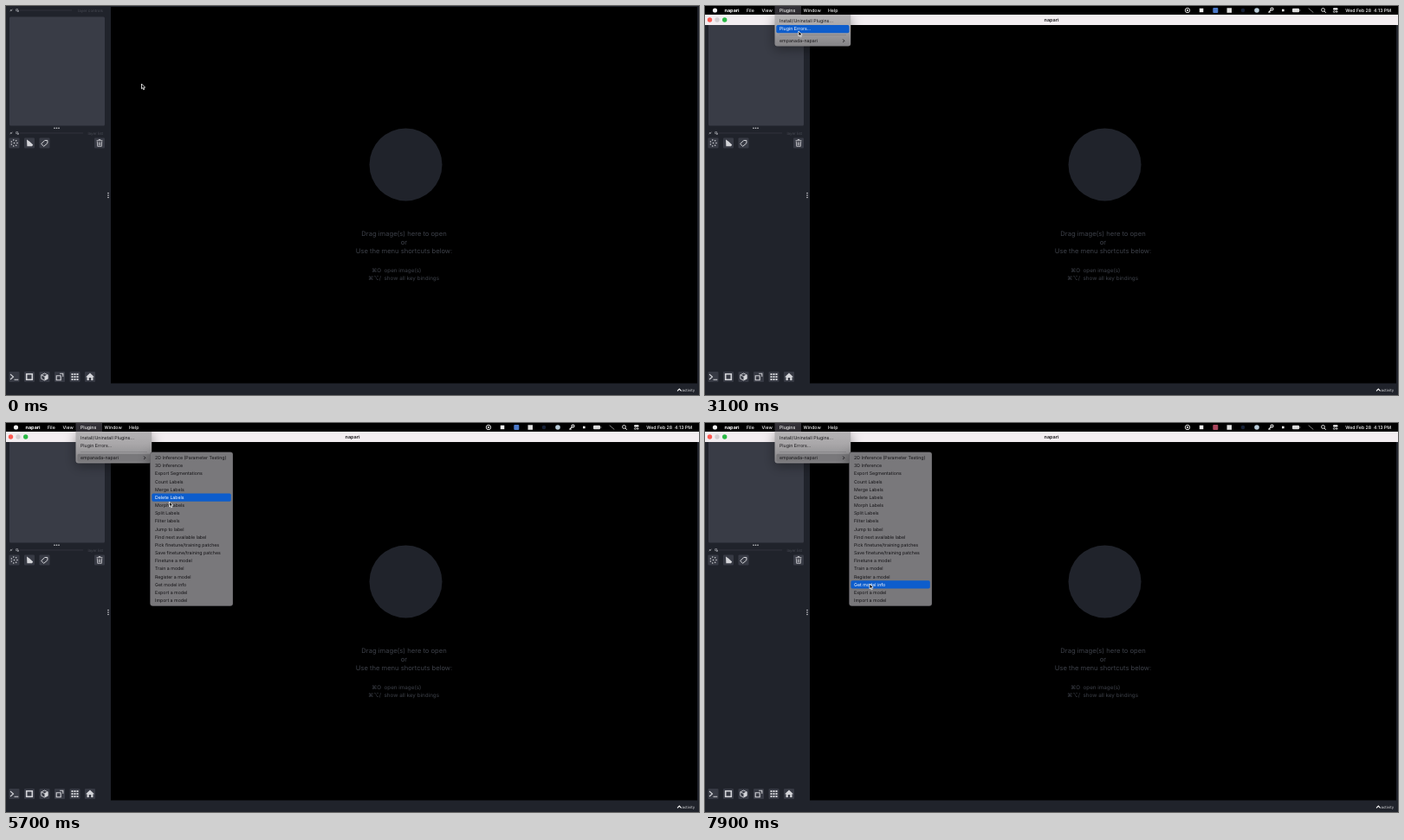
Animation of 800 by 450 pixels, one loop 8 s. Source, as an HTML page with a canvas:

```html
<!DOCTYPE html>
<html lang="en">
<head>
<meta charset="utf-8">
<title>Plugin menu</title>
<style>
html, body { margin: 0; width: 100%; height: 100%; overflow: hidden; background: #20232b; }
canvas { display: block; width: 800px; height: 450px; }
</style>
</head>
<body>
<canvas id="stage" width="800" height="450"></canvas>
<script>
const ctx = document.getElementById('stage').getContext('2d');
const LOOP = 8000, STEP = 100;
const PANEL = '#20232b', BUTTON = '#373a44', ICON = '#d3d4d8', DIM = '#3d4049', BLUE = '#0d5dcc';

const MENU = [['Install/Uninstall Plugins...', 17], ['Plugin Errors...', 26.6], ['empanada-napari', 40.3]];
const TOOLS = ['2D Inference (Parameter Testing)', '3D Inference', 'Export Segmentations', 'Count Labels',
  'Merge Labels', 'Delete Labels', 'Morph Labels', 'Split Labels', 'Filter labels', 'Jump to label',
  'Find next available label', 'Pick finetune/training patches', 'Save finetune/training patches',
  'Finetune a model', 'Train a model', 'Register a model', 'Get model info', 'Export a model', 'Import a model'];
const ROW = 9.17, FIRST_ROW = 40.2;

// time, x, y of the pointer tip
const POINTER = [[300, 156.5, 90], [700, 122, 42], [1100, 89, -1], [1800, 89, -1], [2100, 91, 2],
  [2400, 91, 2], [2600, 93, 5], [2800, 93, 5], [2900, 99, 15], [3100, 108, 29], [3300, 111, 37],
  [3700, 114, 39], [4200, 129, 39], [4600, 172, 39], [5000, 186, 40], [5100, 187, 41],
  [5700, 188.5, 91], [6000, 189.5, 115], [6600, 190.5, 151], [6900, 190.5, 168],
  [7300, 190, 182], [7600, 190, 185], [7800, 190, 185], [7900, 190, 186]];

function pointerAt(t) {
  const i = POINTER.findIndex(p => p[0] >= t);
  if (i <= 0) return POINTER[i < 0 ? POINTER.length - 1 : 0].slice(1);
  const [t0, x0, y0] = POINTER[i - 1], [t1, x1, y1] = POINTER[i];
  const k = (t - t0) / (t1 - t0);
  return [x0 + (x1 - x0) * k, y0 + (y1 - y0) * k];
}

function rect(x, y, w, h, fill, radius = 0) {
  ctx.fillStyle = fill;
  ctx.beginPath();
  ctx.roundRect(x, y, w, h, radius);
  ctx.fill();
}

function disc(x, y, r, fill) {
  ctx.fillStyle = fill;
  ctx.beginPath();
  ctx.arc(x, y, r, 0, Math.PI * 2);
  ctx.fill();
}

function ring(x, y, r, color, width = 0.9) {
  ctx.strokeStyle = color;
  ctx.lineWidth = width;
  ctx.beginPath();
  ctx.arc(x, y, r, 0, Math.PI * 2);
  ctx.stroke();
}

// Strokes or fills an SVG path whose origin sits at x, y
function shape(x, y, d, { fill, stroke, width = 1 }) {
  ctx.save();
  ctx.translate(x, y);
  const path = new Path2D(d);
  if (fill) { ctx.fillStyle = fill; ctx.fill(path); }
  if (stroke) { ctx.strokeStyle = stroke; ctx.lineWidth = width; ctx.stroke(path); }
  ctx.restore();
}

// y is the middle of the capitals
function text(str, x, y, size, color, align = 'left', weight = 400) {
  ctx.font = `${weight} ${size}px Inter, "DejaVu Sans", sans-serif`;
  ctx.textRendering = 'geometricPrecision';
  ctx.textAlign = align;
  ctx.fillStyle = color;
  ctx.fillText(str, x, y + size * 0.36);
}

function dockHeader(y, label, lineEnd) {
  shape(6, y, 'M-1.5 1L1.5-1M-1-1L.5 1', { stroke: '#a9abb0', width: 0.7 });
  shape(13, y, 'M-1.3-1.3H.7V.7H-1.3ZM0 1.4H1.5V0', { stroke: '#a9abb0', width: 0.7 });
  rect(16, y - 0.4, lineEnd - 16, 0.8, '#30333c');
  text(label, 112, y, 4.5, '#484b54', 'right');
}

function button(x, y, draw) {
  rect(x - 6, y - 6, 12, 12, BUTTON, 1);
  draw(x, y);
}

const line = (d, width = 1) => (x, y) => shape(x, y, d, { stroke: ICON, width });
const solid = d => (x, y) => shape(x, y, d, { fill: ICON });

function pointsIcon(x, y) {
  for (let i = 0; i < 7; i++) {
    const a = i * Math.PI * 2 / 7;
    disc(x + Math.cos(a) * 3.5, y + Math.sin(a) * 3.5, 0.75, ICON);
  }
  disc(x, y, 0.8, ICON);
}

function gridIcon(x, y) {
  for (let i = 0; i < 9; i++) rect(x - 4 + i % 3 * 3, y - 4 + Math.floor(i / 3) * 3, 2, 2, ICON);
}

function cubeIcon(x, y) {
  line('M0-4L3.7-2.2V2.2L0 4L-3.7 2.2V-2.2ZM-3.7-2.2L0-.4L3.7-2.2', 0.9)(x, y);
  solid('M0-.4L3.7-2.2V2.2L0 4Z')(x, y);
}

function drawWindow() {
  rect(0, 0, 800, 450, PANEL);
  rect(121, 1, 677, 435.5, '#000');

  dockHeader(5, 'layer controls', 76);
  rect(4, 12.5, 110, 126, '#393c46', 1.5);
  dockHeader(147, 'layer list', 89);
  for (const d of [-2.5, 0, 2.5]) {
    disc(58.5 + d, 141.3, 0.8, ICON);
    disc(118, 219 + d, 0.8, ICON);
  }

  button(9.5, 158.5, pointsIcon);
  button(27, 158.5, solid('M-3-4L.5-1.5L4.2 2L3 3.7H-2.6Z'));
  button(44.5, 158.5, line('M-3.8 1L.2-3H3.4V.2L-.8 3.8Z'));
  button(108, 158.5, line('M-3.4-2.8H3.4M-1.2-4H1.2M-2.7-2L-2.3 3.8H2.3L2.7-2M-.8-1V2.8M.8-1V2.8', 0.8));

  button(9.5, 429, line('M-4.5-3L-1 0L-4.5 3M0 3.2H4.8', 1.1));
  button(27, 429, line('M-3.3-3.3H3.3V3.3H-3.3Z', 1.6));
  button(44.5, 429, cubeIcon);
  button(62, 429, line('M-3.8-1.2H1.2V3.8H-3.8ZM.2-3.8H3.8V-.2', 1.1));
  button(79.5, 429, gridIcon);
  button(97, 429, solid('M0-4.5L5 .3H3.5V4H1.2V1H-1.2V4H-3.5V.3H-5Z'));

  disc(461.5, 183.5, 42, PANEL);
  text('Drag image(s) here to open', 459.5, 263.5, 7.6, DIM, 'center');
  text('or', 459.5, 273.5, 7.6, DIM, 'center');
  text('Use the menu shortcuts below:', 459.5, 283.3, 7.6, DIM, 'center');
  text('⌘O', 433, 305.5, 6.3, DIM, 'right');
  text('open image(s)', 436.5, 305.5, 6.3, DIM);
  text('⌘⌥/', 433, 314.3, 6.3, DIM, 'right');
  text('show all key bindings', 436.5, 314.3, 6.3, DIM);

  shape(777.3, 444, 'M-2.3 1.3L0-1L2.3 1.3', { stroke: '#fff', width: 1.1 });
  text('activity', 780.5, 444, 4.3, '#d8d9dc');
}

function drawTitleBar(y) {
  rect(0, y - 6, 800, 12, '#f3eef1');
  disc(5.5, y, 2.7, '#fb5a52');
  disc(14, y, 2.7, '#d3ced1');
  disc(22.7, y, 2.7, '#2ab845');
  text('napari', 400, y, 5.45, '#29272a', 'center', 700);
}

function drawStatusIcons(y, alert) {
  const white = '#f2f2f2';
  ring(557, y, 2.7, white);
  rect(556, y - 1, 2, 2, white);
  rect(570.8, y - 2.3, 4.5, 4.5, white);
  rect(586.3, y - 3, 6, 6, alert ? '#a9455c' : '#4a78c8', 1);
  rect(602.5, y - 2.7, 5.5, 5.5, '#e0e0e0');
  disc(621, y, 2.3, '#152036');
  disc(637, y, 2.8, '#b9cbd8');
  ring(654.5, y - 1.5, 1.5, white, 1.1);
  shape(653.5, y - 0.5, 'M0 0L-3 3M-2 2L-1 3', { stroke: white, width: 1.1 });
  rect(666, y - 1.3, 2.6, 2.6, white);
  rect(678, y - 2.2, 8, 4.4, '#dcdcdc', 1);
  rect(686.5, y - 0.8, 0.8, 1.6, '#aaa');
  shape(699.5, y, 'M-2.8-2.3L2.8 2.5', { stroke: '#bbb', width: 0.7 });
  ring(713.5, y - 0.5, 1.9, white);
  shape(714.8, y + 0.9, 'M0 0L1.9 1.9', { stroke: white });
  rect(725, y - 2.7, 5.6, 2.3, white, 1.1);
  ring(726.3, y + 1.5, 0.9, white, 0.7);
  rect(727.5, y + 0.4, 3.1, 2.2, '#b5b5b5', 1);
}

function drawMenuBar(y, open, alert) {
  rect(0, y - 5, 800, 10, '#000');
  if (open) rect(80.5, y - 5, 30.5, 10, '#343238');
  disc(11.5, y, 2.6, '#f2f2f2');
  text('napari', 22.5, y, 5.5, '#fff', 'left', 700);
  const items = [['File', 48], ['View', 65.5], ['Plugins', 86], ['Window', 113.5], ['Help', 142]];
  for (const [label, x] of items) text(label, x, y, 5.2, '#fff', 'left', 500);
  drawStatusIcons(y, alert);
  text('Wed Feb 28  4:13 PM', 792, y, 5.25, '#fff', 'right', 500);
}

function popup(x, y, w, h, fill, radius) {
  ctx.save();
  ctx.shadowColor = 'rgba(0,0,0,.4)';
  ctx.shadowBlur = 14;
  ctx.shadowOffsetY = 3;
  rect(x, y, w, h, fill, radius);
  ctx.restore();
}

function drawMenu(selected, inSubmenu) {
  const fill = ctx.createLinearGradient(0, 10, 0, 46);
  fill.addColorStop(0, '#b5b3b5');
  fill.addColorStop(0.4, '#a9a7a9');
  fill.addColorStop(1, '#858487');
  popup(80.5, 10, 87.7, 36.5, fill, [0, 0, 3, 3]);
  rect(86, 33.2, 77, 0.6, '#7b7a7c');
  MENU.forEach(([label, y], i) => {
    const active = i === selected;
    if (active) rect(82.3, y - 4.6, 84.2, 9.2, inSubmenu ? '#79787b' : BLUE, 1.7);
    const color = active && !inSubmenu ? '#fff' : '#161518';
    text(label, 86, y, 5.25, color);
    if (i === 2) shape(160, y, 'M-.8-1.7L.9 0L-.8 1.7', { stroke: color, width: 0.9 });
  });
}

function drawSubmenu(selected) {
  popup(166.3, 33.5, 95.7, 178.2, '#5c5b5e', 3);
  rect(166.8, 34, 94.7, 177.2, '#79787b', 2.6);
  TOOLS.forEach((label, i) => {
    const y = FIRST_ROW + i * ROW;
    if (i === selected) rect(168.4, y - 4.6, 91.4, 9.2, BLUE, 1.7);
    text(label, 172, y, 5.25, i === selected ? '#fff' : '#121114');
  });
}

function drawPointer([x, y]) {
  shape(x, y, 'M0 0V5.8L1.3 4.7L2.2 6.8L3.2 6.4L2.3 4.4L4.1 4.2Z',
    { fill: '#000', stroke: '#fff', width: 0.8 });
}

function draw(t) {
  const menuOpen = t >= 1900, submenuOpen = t >= 3600;
  drawWindow();
  if (t >= 1300) {
    const hidden = Math.max(0, (1600 - t) / 300) ** 1.5;
    drawTitleBar(16 - 9.5 * hidden);
    drawMenuBar(5 - 8 * hidden, menuOpen, t >= 7900);
  }
  // The highlight trails the pointer by one step
  const [hoverX, hoverY] = pointerAt(t - STEP);
  const inSubmenu = submenuOpen && hoverX > 167;
  if (menuOpen) {
    const row = hoverY < 12 ? -1 : hoverY < 22 ? 0 : hoverY < 33 ? 1 : 2;
    drawMenu(inSubmenu ? 2 : row, inSubmenu);
  }
  if (submenuOpen) drawSubmenu(inSubmenu ? Math.round((hoverY - FIRST_ROW) / ROW) : -1);
  drawPointer(pointerAt(t));
}

function frame() {
  const t = performance.now() % LOOP;
  draw(Math.floor(t / STEP) * STEP);
  requestAnimationFrame(frame);
}
frame();
</script>
</body>
</html>
```
